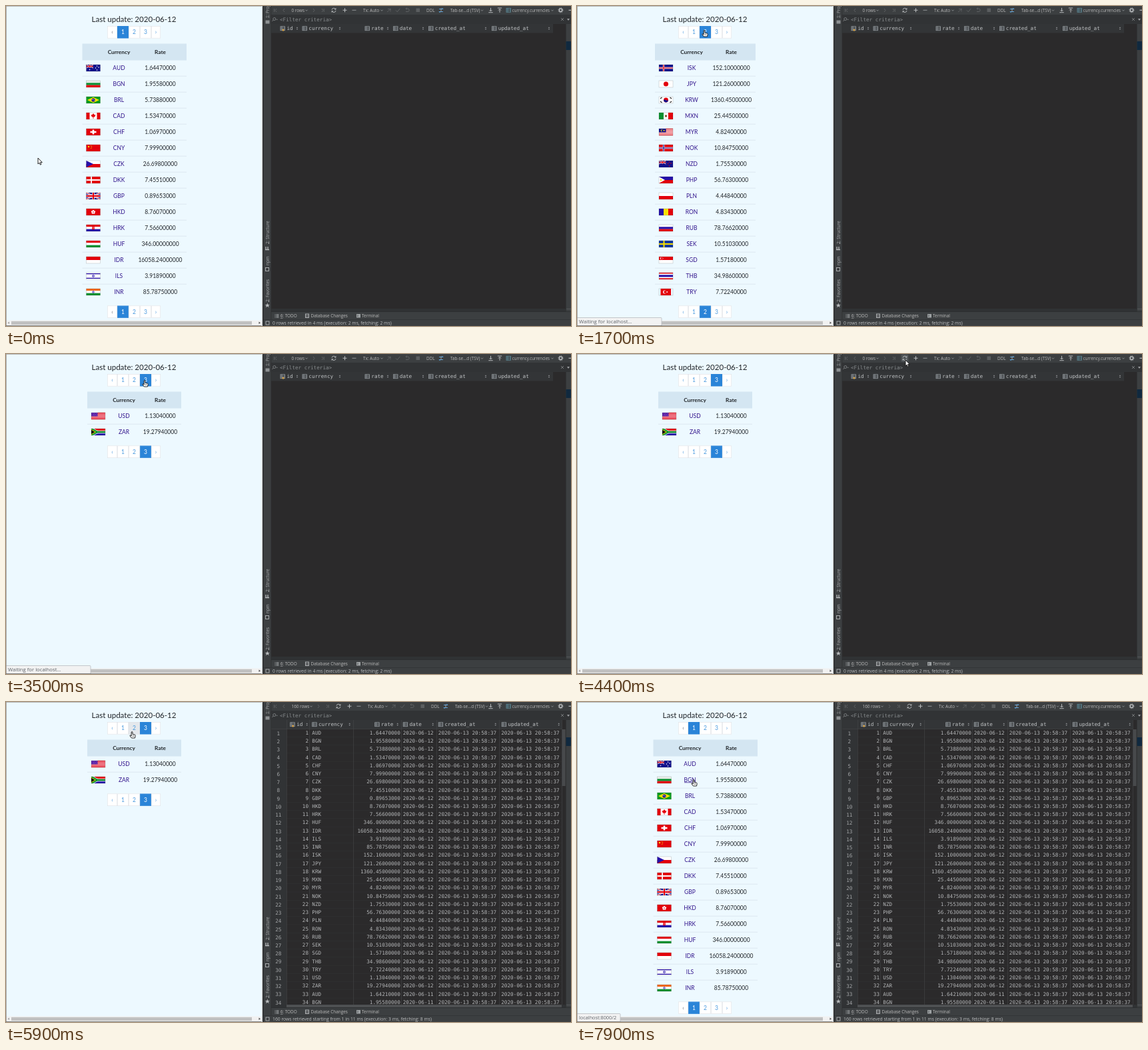
Recreate the animation shown at these times as an HTML page. Size 848x480 px, loop 8 s.

```html
<!DOCTYPE html>
<html lang="en">
<head>
<meta charset="utf-8">
<title>Exchange rates</title>
<style>
html, body { margin: 0; width: 100%; height: 100%; overflow: hidden; background: #edf9ff; }
svg { display: block; width: 848px; height: 480px; }
text { white-space: pre; }
.web { font-family: Lato, sans-serif; }
.ui { font-family: "Open Sans", "Noto Sans", sans-serif; }
.mono { font-family: "DejaVu Sans Mono", monospace; }
</style>
</head>
<body>
<svg id="stage" viewBox="0 0 848 480"></svg>
<script>
const LOOP = 8000, TICK = 100;
const RATES = `AUD 1.6447,BGN 1.9558,BRL 5.7388,CAD 1.5347,CHF 1.0697,CNY 7.999,CZK 26.698,DKK 7.4551,
GBP .89653,HKD 8.7607,HRK 7.566,HUF 346,IDR 16058.24,ILS 3.9189,INR 85.7875,ISK 152.1,JPY 121.26,
KRW 1360.45,MXN 25.445,MYR 4.824,NOK 10.8475,NZD 1.7553,PHP 56.763,PLN 4.4484,RON 4.8343,RUB 78.7662,
SEK 10.5103,SGD 1.5718,THB 34.986,TRY 7.7224,USD 1.1304,ZAR 19.2794`
  .split(/,\s*/).map(s => s.split(' ')).map(([code, n]) => [code, (+n).toFixed(8)]);

// drawing helpers
const R = (x, y, w, h, c, more = '') => `<rect x="${x}" y="${y}" width="${w}" height="${h}" fill="${c}" ${more}/>`;
const C = (x, y, r, c, more = '') => `<circle cx="${x}" cy="${y}" r="${r}" fill="${c}" ${more}/>`;
const P = (d, c, more = '') => `<path d="${d}" fill="${c}" ${more}/>`;
const L = (d, c, w = 1, more = '') => `<path d="${d}" fill="none" stroke="${c}" stroke-width="${w}" ${more}/>`;
const G = (body, x = 0, y = 0, id = '') => `<g ${id && `id="${id}"`} transform="translate(${x} ${y})">${body}</g>`;
const T = (cls, x, y, s, size, c, more = '') =>
  `<text class="${cls}" x="${x}" y="${y + size * .36}" font-size="${size}" fill="${c}" ${more}>${s.replace(/</g, '&lt;')}</text>`;
const MID = 'text-anchor="middle"', END = 'text-anchor="end"';
const web = (x, y, s, size, c, more = MID) => T('web', x, y, s, size, c, more);
const ui = (x, y, s, c = '#bbb', size = 6.4, more = '') => T('ui', x, y, s, size, c, more);
const mono = (x, y, s, c = '#b4b6b8', more = '') => T('mono', x, y, s, 7.65, c, more);

// flags, 21 by 10
const red = '#e3000b', navy = '#12128c', blue = '#2510a8', green = '#0a9030', white = '#fff', gold = '#f8e000';
const hs = (...cs) => cs.map((c, i) => R(0, i * 10 / cs.length, 21, 10 / cs.length, c)).join('');
const vs = (...cs) => cs.map((c, i) => R(i * 21 / cs.length, 0, 21 / cs.length, 10, c)).join('');
const dots = (c, r, ...pts) => pts.map(([x, y]) => C(x, y, r, c)).join('');
const cross = (x, c, w) => L(`M${x} 0V10M0 5H21`, c, w);
const uk = (k = 1) => `<g transform="scale(${k})">` + R(0, 0, 21, 10, navy) + L('M0 0L21 10M0 10L21 0', white, 2) +
  L('M0 0L21 10M0 10L21 0', red, .7) + cross(10.5, white, 3.4) + cross(10.5, red, 2) + '</g>';
const stripes = (n, a, b = white) => hs(...Array.from({ length: n }, (_, i) => i % 2 ? b : a));
const FLAGS = {
  AUD: hs(navy) + uk(.5) + dots(white, .8, [5, 7.5], [16, 2], [14, 5], [18.5, 4], [16, 8]),
  BGN: hs('#e9efe9', green, red),
  BRL: hs('#0a9b20') + P('M10.5 .8L19.5 5L10.5 9.2L1.5 5Z', gold) + C(10.5, 5, 2.6, navy) + L('M8.2 4.6Q11 4 12.8 5.8', white, .6),
  CAD: R(0, 0, 21, 10, white) + R(0, 0, 5, 10, red) + R(16, 0, 5, 10, red) + P('M10.5 1L12 3L14 3.5L12.5 6.5H8.5L7 3.5L9 3ZM10.1 6H10.9V9H10.1Z', red),
  CHF: hs(red) + L('M10.5 1.5V8.5M6 5H15', white, 2.6),
  CNY: hs(red) + dots(gold, 1.2, [3.5, 3]) + dots(gold, .5, [7, 1.2], [8, 2.6], [8, 4.2], [7, 5.5]),
  CZK: hs(white, red) + P('M0 0L10.5 5L0 10Z', blue),
  DKK: hs(red) + cross(7.5, white, 1.8),
  GBP: uk(),
  HKD: hs(red) + dots(white, 1.2, [10.5, 3.2], [8.6, 4.5], [12.4, 4.5], [9.3, 6.5], [11.7, 6.5]),
  HRK: hs(red, white, blue) + R(8.7, 2.6, 3.6, 4.6, red) + dots(white, .5, [9.7, 4], [11.3, 4], [10.5, 5.5]),
  HUF: hs(red, white, green),
  IDR: hs(red, white),
  ILS: hs(white) + R(0, 1, 21, 1.3, blue) + R(0, 7.7, 21, 1.3, blue) + L('M10.5 3L12.3 6H8.7ZM10.5 7L8.7 4H12.3Z', blue, .5),
  INR: hs('#f06a20', white, green) + C(10.5, 5, 1.3, 'none', `stroke="${blue}" stroke-width=".8"`),
  ISK: hs(navy) + cross(7, white, 2.4) + cross(7, red, 1.2),
  JPY: hs(white) + C(10.5, 5, 3.6, red),
  KRW: hs(white) + C(10.5, 5, 3.4, red) + P('M7.1 5A3.4 3.4 0 0 0 13.9 5Q12 6.5 10.5 5T7.1 5Z', navy) +
    L('M2 3L4.5 1M2 7L4.5 9M16.5 1L19 3M16.5 9L19 7', '#333', 1.3),
  MXN: vs(green, white, red) + C(10.5, 5, 1.7, '#7a5a30'),
  MYR: stripes(9, red) + R(0, 0, 10.5, 5.5, navy) + C(4.5, 2.8, 1.7, gold) + C(5.2, 2.8, 1.4, navy) + C(7.6, 2.8, 1, gold),
  NOK: hs(red) + cross(7, white, 2.6) + cross(7, navy, 1.2),
  NZD: hs(navy) + uk(.5) + dots(red, .8, [15.5, 2], [13.5, 4.5], [18, 4], [15.5, 8]),
  PHP: hs(blue, red) + P('M0 0L9 5L0 10Z', white) + C(3, 5, 1.2, gold),
  PLN: hs(white, red),
  RON: vs(blue, gold, red),
  RUB: hs(white, blue, red),
  SEK: hs('#153a9c') + cross(7.5, gold, 2),
  SGD: hs(red, white) + C(3.5, 2.5, 1.7, white) + C(4.2, 2.5, 1.5, red) + dots(white, .4, [5.5, 1.5], [6.5, 2.5], [5.5, 3.5]),
  THB: hs(red, white, blue, blue, white, red),
  TRY: R(2.5, 0, 15.5, 10, red) + C(8.5, 5, 2.5, white) + C(9.3, 5, 2, red) + C(12.2, 5, .9, white),
  USD: stripes(9, red, '#f590a4') + R(0, 0, 9.5, 5.5, '#5a22a8') + dots('#b08ad0', .4, [2, 1.5], [4.7, 1.5], [7.4, 1.5], [3.3, 3], [6, 3], [2, 4.4], [4.7, 4.4], [7.4, 4.4]),
  ZAR: hs(red, red, blue, blue) + P('M0 0H4L10 3.2H21V6.8H10L4 10H0Z', white) + P('M0 0H2.5L9.5 3.8H21V6.2H9.5L2.5 10H0Z', green) +
    P('M0 .8L7 5L0 9.2Z', gold) + P('M0 1.8L5.5 5L0 8.2Z', '#111')
};

// web page
const EDGES = [152, 167, 184, 201, 218, 232];
function pager(y, page, top) {
  return R(152, y, 80, 18.5, white) + EDGES.slice(0, 5).map((x, i) => {
    const w = EDGES[i + 1] - x, on = i === page;
    const frame = on ? top ? '' : 'stroke="#9cc4ea" stroke-dasharray="1 1"' : 'stroke="#dee2e6"';
    return R(x, y, w, 18.5, on ? '#2a84d8' : white, top && !on ? `class="hit${i}"` : '') +
      R(x + .3, y + .3, w - .6, 17.9, 'none', frame + ' stroke-width=".6"') +
      web(x + w / 2, y + 9.3, '‹123›'[i], 8.5, on ? white : i === 0 && page === 1 ? '#6c757d' : '#4a9ade');
  }).join('');
}
function sheet(page, left, right, mid) {
  const rows = RATES.slice(page * 15 - 15, page * 15);
  return R(left, 56.5, right - left, 25, '#d4e6f2') +
    web(mid, 69, 'Currency', 8.3, '#212529', MID + ' font-weight="700"') +
    web(231.5, 69, 'Rate', 8.3, '#212529', MID + ' font-weight="700"') +
    rows.map(([code, rate], i) => {
      const y = 93 + 24 * i;
      return (i ? R(left, y - 12.2, right - left, .7, '#d5e2ea') : '') +
        G(FLAGS[code] + R(0, 0, 21, 10, 'none', 'stroke="#000" stroke-opacity=".25" stroke-width=".5"'), left + 6, y - 5) +
        web(mid, y, code, 8.5, '#32158c') + web(231.5, y, rate, 8.5, '#212529');
    }).join('') +
    pager(30, page, true) + pager(page === 3 ? 137.5 : 449.5, page);
}
const browser = R(0, 0, 385, 480, '#edf9ff') +
  web(192, 19.5, 'Last update: 2020-06-12', 11.55, '#212529') +
  G(sheet(1, 114.5, 271, 169.5), 0, 0, 'page1') + G(sheet(2, 117, 268, 172), 0, 0, 'page2') +
  G(sheet(3, 122, 263, 177), 0, 0, 'page3') +
  G(R(161, 120.5, 17, .7, '#32158c'), 0, 0, 'under') +
  R(0, 471.5, 385, 8, '#f1f1f1') + R(8, 472.8, 361, 5.2, '#c1c1c1') +
  P('M5 473.5V477L2.5 475.2Z', '#a3a3a3') + P('M379.5 473.5V477L382 475.2Z', '#505050') +
  G(R(-2, 467.5, 129, 14, '#f2f2f2', 'id="bubble" stroke="#b8bcc0" stroke-width=".8" rx="1"') +
    T('ui', 3, 473.5, ' ', 7.3, '#5f6368', 'id="link"'), 0, 0, 'status') +
  R(0, 0, 385, .8, '#aaa') + R(0, 0, .8, 480, '#999') + R(0, 479.2, 386, .8, '#666') + R(383.6, 0, 1.4, 480, '#d8dcde');

// database window
const dim = '#626567', ink = '#b5b8ba', panel = '#3c3f41';
const chev = (x, y = 6.5) => L(`M${x - 1.6} ${y - .8}l1.6 1.6l1.6 -1.6`, '#9a9da0', .8);
const grid = (x, y, c = '#9aa0a5') => R(x - 3, y - 3, 6.5, 6, 'none', `stroke="${c}" stroke-width=".8"`) +
  L(`M${x - 3} ${y - 1}h6.5M${x - 1} ${y - 3}v6M${x - 3} ${y + 1}h6.5`, c, .7);
const sorter = x => P(`M${x - 1.3} 33l1.3 -1.5l1.3 1.5ZM${x - 1.3} 34.3l1.3 1.5l1.3 -1.5Z`, '#9a9da0');
const column = (x, name, end) => grid(x, 33.7) + mono(x + 6.3, 33.5, name, '#c0c3c5') + sorter(end);
const arrow = (x, d, bar) => L(`M${x - d} 4l${2 * d} 2.5l${-2 * d} 2.5` + (bar ? `M${x + d * 2.2} 4v5` : ''), dim, .9);

const headers = column(415, ' ', 437) + C(416, 36, 1.5, '#d9a343') + mono(421.5, 33.5, 'id', '#c0c3c5') +
  column(448, 'currency', 501) + column(542, 'rate', 573) + column(584.5, 'date', 626) +
  column(637.5, 'created_at', 720) + column(732.5, 'updated_at', 815);

const tools = arrow(462, 1, false) + arrow(475, 1, true) +
  R(486.5, .8, 11, 11, '#4f5457', 'id="hot" rx="1.5"') +
  L('M489 5.5A3 3 0 0 1 494.4 4.6M495 7A3 3 0 0 1 489.6 8.2', ink, 1) + P('M495.4 2.8V5.6H492.6ZM488.6 10V7.2H491.4Z', ink) +
  L('M505.5 6.3h6M508.5 3.3v6', ink, 1.1) + L('M519.5 6.3h6', '#8a8d8f', 1.1) +
  ui(536, 6.3, 'Tx: Auto') + chev(564) +
  L('M572 9l6 -5M573 4.5h4v4', dim, .8) + L('M585 6.5l2.3 2.3l4 -5', dim, .9) + L('M600 4h3a2.2 2.2 0 0 1 0 4.4h-3M601.5 2.5L600 4l1.5 1.5', dim, .9) +
  R(615.5, 3.5, 5.5, 5.5, '#5b5e60', 'id="stop"') +
  ui(631, 6.3, 'DDL') + L('M650 4.5h6l-1.6 -1.6M656 8.5h-6l1.6 1.6', '#5a9fd6', 1) + L('M653 3.5v5', ink, .8) +
  ui(667, 6.3, 'Tab-se...d (TSV)') + chev(714.5);

const side = (y, s) => ui(0, 0, s, '#aeb1b3', 6.4, `transform="translate(392.5 ${y}) rotate(-90)"`) +
  (s[1] === ':' ? R(394.6, y - 3.6, .5, 3.6, '#aeb1b3') : '');

const lines = Array.from({ length: 34 }, (_, i) => {
  const y = 46.1 + i * 12.24, [code, rate] = RATES[i % 32];
  const value = i === 32 ? '1.64210000' : rate, stamp = '2020-06-13 20:58:37';
  return mono(408.8, y + .9, i + 1 + '', '#a4a6a8', MID) + mono(454, y, i + 1 + '', undefined, END) + mono(459.3, y, code) +
    mono(591.8, y, value, undefined, END) + mono(595.7, y, i < 32 ? '2020-06-12' : '2020-06-11') +
    mono(648.8, y, stamp) + mono(743.2, y, stamp) + R(421, y + 6.1, 413, .4, '#333537');
}).join('');
const rules = [421, 455, 521, 593, 646, 740, 834].map(x => R(x, 27, .6, 427, '#454749')).join('');

const ide = R(385, 0, 463, 480, panel) + R(398, 13, 442, 445, '#2b2a2b') + R(398, 13, 450, 14, '#313335') +
  R(398, 27, 423, 13.5, '#333537', 'id="head"') + R(398, 454, 442, 4.5, '#303234') +
  G(R(398, 40, 23, 414, '#313335') + lines + rules + R(398, 40.2, 436, .6, '#454749') +
    R(834.6, 41, 5, 85, '#484a4c') + R(421, 454, 413, 4, '#4e5052'), 0, 0, 'data') +
  R(398, 458, 450, .8, '#2a2c2d') + R(385, 470, 463, .7, '#303233') +
  R(385, 0, 1.4, 480, '#2c2e2f') + R(397.6, 0, .7, 470, '#2e3031') +
  R(840, 27, .7, 431, '#2e3031') + R(840.5, 53, 7.5, 13, '#10293f') + R(841, 454, 7, 1, '#55585a') +
  L('M406 4l-2 2.5l2 2.5M402.5 4v5M418 4l-2 2.5l2 2.5', dim, .9) +
  T('ui', 428.5, 6.3, '0 rows', 6.4, '#bbb', 'id="count"') +
  G(chev(451) + tools, 0, 0, 'tools') +
  L('M727.5 2.8v5M725.5 6l2 2l2 -2M724.3 9.7h6.4', ink, 1) + L('M741 9.8v-5M739 6.5l2 -2l2 2M737.8 3h6.4', ink, 1) +
  grid(754, 6.3, '#5d8d9c') + ui(759.8, 6.3, 'currency.currencies', '#bbb', 6.2) + chev(820) +
  C(832.5, 6.3, 2.2, 'none', `stroke="${ink}" stroke-width="1.5"`) +
  C(832.5, 6.3, 3.5, 'none', `stroke="${ink}" stroke-width="1" stroke-dasharray="1.3 1.45"`) + L('M844.5 6.3h3.5', ink, 1.2) +
  C(402.8, 19.5, 2, 'none', `stroke="#8a8d8f" stroke-width=".8"`) + L('M401.3 21l-2 2M405.6 20.3h2', '#8a8d8f', .8) +
  mono(411, 20, '<Filter criteria>', '#868a8c') + L('M833 18l4 4M837 18l-4 4', '#85888a', .8) + P('M842 19h4l-2 3Z', '#9a9da0') +
  G(headers, 0, 0, 'columns') +
  side(18, '1: Project') + R(389.5, 21.5, 6, 5, '#8d9193') + side(357, '2: Structure') +
  L('M390 361v5M393 361v5M389 365.5h6', ink, 1.3) + side(389, 'npm') +
  R(389.5, 392.5, 5, 5, 'none', `stroke="${ink}" stroke-width=".9"`) + side(444, '2: Favorites') +
  P('M392.3 445.5l1 2.4h2.6l-2 1.7l.8 2.6l-2.4 -1.6l-2.4 1.6l.8 -2.6l-2 -1.7h2.6Z', ink) +
  L('M403.5 463h1M403.5 465h1M403.5 467h1M405.5 463h4M405.5 465h4M405.5 467h4', ink, .9) + ui(411.7, 464.7, '6: TODO') + R(411.9, 468, 3.6, .5, '#bbb') +
  R(449.5, 462, 5, 5.5, 'none', `stroke="${ink}" stroke-width=".9"`) + L('M450 464h4M450 466h4', ink, .6) + ui(457.5, 464.7, 'Database Changes') +
  R(526, 462, 6, 5.5, '#9da1a3') + L('M527 463.3l1.5 1.4l-1.5 1.4', panel, .8) + ui(534, 464.7, 'Terminal') +
  R(390, 473, 5, 5, 'none', `stroke="${ink}" stroke-width=".9"`) +
  T('ui', 400, 475.8, ' ', 6.8, '#bdbfc1', 'id="info"') +
  G(Array.from({ length: 8 }, (_, i) => C(5 * Math.cos(i * Math.PI / 4), 5 * Math.sin(i * Math.PI / 4), 1.1, '#9aa0a6', `opacity="${.35 + i * .08}"`)).join(''), 616, 228, 'spin');

const pointer = G(P('M0 0V9L2.1 7.2L3.4 10.2L4.9 9.5L3.6 6.6H6.3Z', white, 'stroke="#111" stroke-width=".9"'), 0, 0, 'arrow') +
  G(P('M-.8 0Q.2 -1 1 0V3.4L4.3 4Q5.3 4.3 5.2 5.5L4.5 9H-.6L-3 5.7Q-3.2 4.6 -2 4.9L-.8 6Z', white, 'stroke="#111" stroke-width=".9"') +
    L('M1.2 5v2M2.8 5v2', '#111', .5), 0, 0, 'hand');

const stage = document.getElementById('stage');
stage.innerHTML = browser + ide + G(pointer, 0, 0, 'cursor');
const $ = id => document.getElementById(id);

// timelines: [start, value]
const at = (steps, t) => steps.filter(s => s[0] <= t).pop()[1];
const WAIT = 'Waiting for localhost…', HOST = 'localhost:8000/';
const PAGE = [[0, 1], [1500, 2], [2900, 3], [6700, 1]];
const LINK = [[0, ''], [1000, HOST + '?page=2'], [1300, WAIT], [2000, ''], [2300, HOST + '?page=3'], [2700, WAIT],
  [3600, ''], [6200, HOST + '?page=1'], [6500, WAIT], [7200, ''], [7700, HOST + '1'], [7900, HOST + '2']];
const PATH = [[0, 48, 228], [800, 190, 38], [900, 191, 36], [1900, 191, 37], [2400, 208, 40], [3500, 208, 40],
  [4200, 491, 8], [4600, 495, 10], [5200, 495, 10], [5900, 189, 45], [6200, 176, 41], [7200, 176, 41], [7900, 175, 117]];
const DATA = 4700, COUNT = 4800, BUSY = 4500;

function place(t) {
  const i = PATH.findIndex(p => p[0] > t);
  if (i < 0) return PATH[PATH.length - 1].slice(1);
  const [a, b] = [PATH[i - 1], PATH[i]], u = (t - a[0]) / (b[0] - a[0]), k = u * u * (3 - 2 * u);
  return [a[1] + (b[1] - a[1]) * k, a[2] + (b[2] - a[2]) * k];
}
const show = (id, on) => { $(id).style.display = on ? '' : 'none'; };

function draw(t) {
  const page = at(PAGE, t), link = at(LINK, t), [x, y] = place(t);
  [1, 2, 3].forEach(n => show('page' + n, n === page));

  const cell = y > 30 && y < 49 ? EDGES.findIndex((e, i) => x >= e && x < EDGES[i + 1]) : -1;
  stage.querySelectorAll('[class^=hit]').forEach(e => e.setAttribute('fill', e.classList.contains('hit' + cell) ? '#e4e8ec' : white));
  const row = page === 1 && x > 160 && x < 179 ? [93, 117].findIndex(r => Math.abs(y - r) < 6) : -1;
  show('under', row >= 0);
  $('under').setAttribute('transform', `translate(0 ${row * 24 - 24})`);
  show('hand', cell >= 0 || row >= 0);
  show('arrow', cell < 0 && row < 0);
  $('cursor').setAttribute('transform', `translate(${x} ${y})`);

  show('status', link);
  $('link').textContent = link;
  $('link').setAttribute('font-size', link === WAIT ? 7.7 : 7.3);
  $('bubble').setAttribute('width', link === WAIT ? 129 : link.length > 17 ? 90 : 67);

  const full = t >= DATA, counted = t >= COUNT, busy = t >= BUSY && !counted;
  show('data', full);
  show('spin', busy);
  $('spin').setAttribute('transform', `translate(616 228) rotate(${t * .45 % 360})`);
  $('stop').setAttribute('fill', busy ? '#c75450' : '#5b5e60');
  show('hot', x > 486 && x < 499 && y < 13 && !counted);
  $('head').setAttribute('width', full ? 436 : 423);
  $('columns').setAttribute('transform', `translate(${full ? 14.7 : 0} 0)`);
  $('tools').setAttribute('transform', `translate(${counted ? 7 : 0} 0)`);
  $('count').textContent = counted ? '160 rows' : '0 rows';
  $('info').textContent = full ? '160 rows retrieved starting from 1 in 11 ms (execution: 3 ms, fetching: 8 ms)'
    : '0 rows retrieved in 4 ms (execution: 2 ms, fetching: 2 ms)';
}

const start = performance.now();
function loop() {
  const t = (performance.now() - start) % LOOP;
  draw(Math.floor(t / TICK) * TICK);
  requestAnimationFrame(loop);
}
loop();
</script>
</body>
</html>
```
